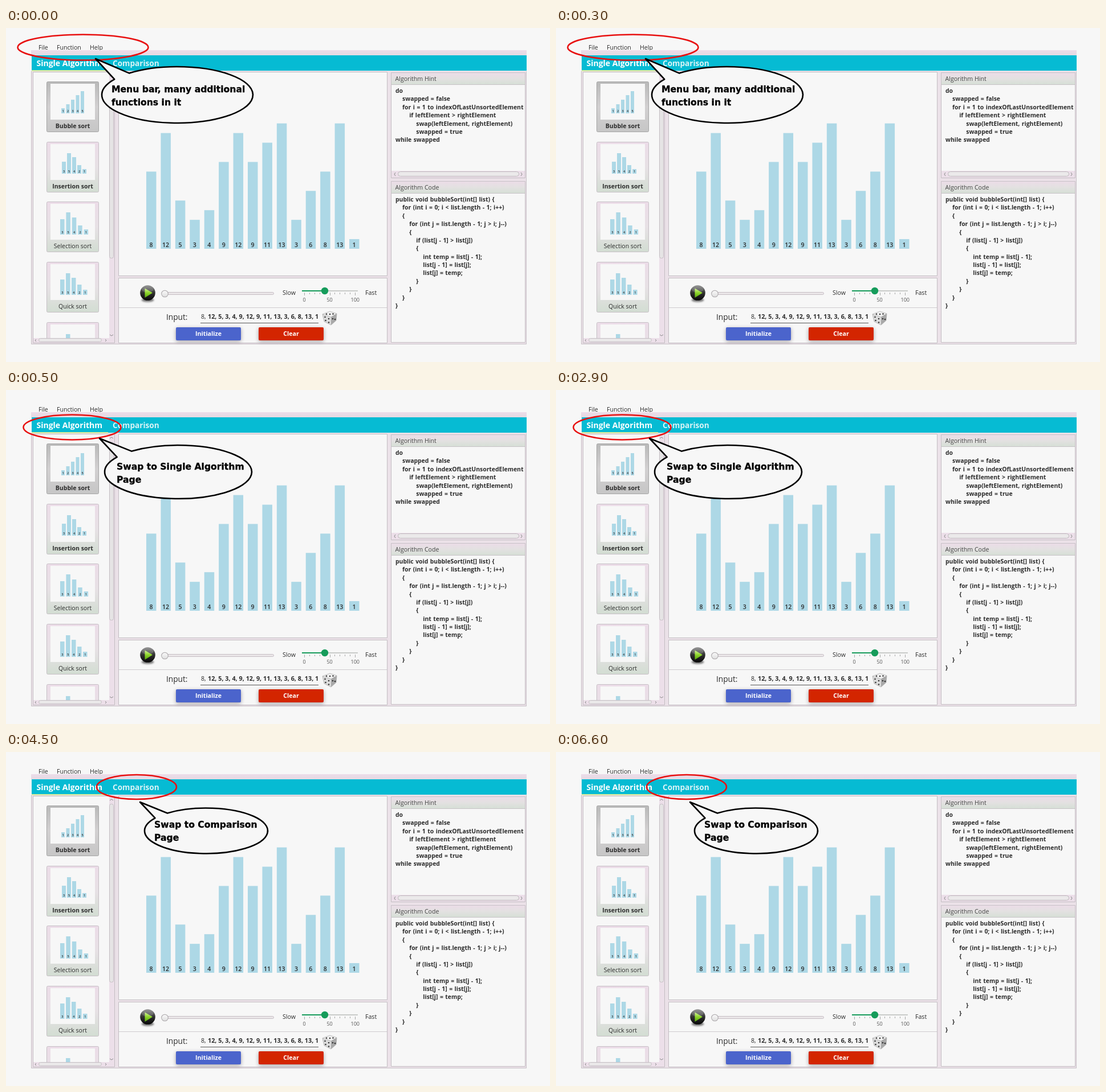
Write an HTML page with a canvas that moves like this. It is 954 px wide and 587 px high and loops after 8 s.

```html
<!DOCTYPE html>
<html lang="en">
<head>
<meta charset="utf-8">
<title>Sorting visualizer tour</title>
<style>
html, body { margin: 0; width: 100%; height: 100%; overflow: hidden; background: #f7f7f7; }
canvas { display: block; }
</style>
</head>
<body>
<canvas id="stage" width="954" height="587"></canvas>
<script>
const ctx = document.getElementById('stage').getContext('2d');
const BG = '#f7f7f7', INK = '#2b2b2b', BAR = '#add8e6', EDGE = '#c3bdc2', TRACK = '#ecdfe9';
const UI = '"Open Sans", "Noto Sans", sans-serif';
const LOOP = 8000;

const values = [8, 12, 5, 3, 4, 9, 12, 9, 11, 13, 3, 6, 8, 13, 1];

const cards = [
  { name: 'Bubble sort', weight: 700, x: 97, step: 8.5, w: 6, base: 150, tops: [141, 134, 126, 118, 111], digits: '12345' },
  { name: 'Insertion sort', weight: 700, x: 98, step: 9, w: 7, base: 256, tops: [235, 220, 227, 241, 248], digits: '35421' },
  { name: 'Selection sort', weight: 400, x: 95, step: 10.4, w: 7.5, base: 363, tops: [336, 324, 333, 347, 354], digits: '35421' },
  { name: 'Quick sort', weight: 400, x: 95, step: 10, w: 7.5, base: 469, tops: [442, 431, 439, 451, 460], digits: '35421' },
  { name: '', weight: 400, x: 95, step: 10, w: 7.5, base: 576, tops: [549, 538, 546, 558, 567], digits: '35421' }
];

const hint = `do
    swapped = false
    for i = 1 to indexOfLastUnsortedElement
        if leftElement > rightElement
            swap(leftElement, rightElement)
            swapped = true
while swapped`;

const code = `public void bubbleSort(int[] list) {
    for (int i = 0; i < list.length - 1; i++)
    {
        for (int j = list.length - 1; j > i; j--)
        {
            if (list[j - 1] > list[j])
            {
                int temp = list[j - 1];
                list[j - 1] = list[j];
                list[j] = temp;
            }
        }
    }
}`;

// ring: cx, cy, rx, ry; bubble: the same; tail: base, tip, base
const steps = [
  { start: 0, ring: [135, 34, 114.5, 22.5], bubble: [300.5, 117.5, 132.5, 49.5],
    tail: [[190, 90], [157, 54], [215, 79]], text: ['Menu bar, many additional', 'functions in it'], at: [185, 113] },
  { start: 500, ring: [116, 65.5, 85.5, 22], bubble: [302, 144, 129, 47],
    tail: [[195, 118], [164, 85], [219, 107]], text: ['Swap to Single Algorithm', 'Page'], at: [194, 140] },
  { start: 4500, ring: [229, 61.5, 70, 21.5], bubble: [351, 138.5, 108, 40],
    tail: [[261, 116], [235, 88], [282, 107]], text: ['Swap to Comparison', 'Page'], at: [260, 133] }
];

function rect(x, y, w, h, fill) {
  ctx.fillStyle = fill;
  ctx.fillRect(x, y, w, h);
}

function box(x, y, w, h, fill, stroke, r = 0) {
  ctx.beginPath();
  ctx.roundRect(x + .5, y + .5, w - 1, h - 1, r);
  ctx.fillStyle = fill;
  ctx.fill();
  ctx.lineWidth = 1;
  ctx.strokeStyle = stroke;
  ctx.stroke();
}

function line(points, color, width = 1) {
  ctx.beginPath();
  points.forEach(([x, y]) => ctx.lineTo(x, y));
  ctx.strokeStyle = color;
  ctx.lineWidth = width;
  ctx.stroke();
}

function disc(x, y, r, fill) {
  ctx.beginPath();
  ctx.arc(x, y, r, 0, Math.PI * 2);
  ctx.fillStyle = fill;
  ctx.fill();
}

function poly(points, fill) {
  ctx.beginPath();
  points.forEach(([x, y]) => ctx.lineTo(x, y));
  ctx.fillStyle = fill;
  ctx.fill();
}

function label(str, x, y, { size = 10.6, weight = 400, color = INK, align = 'left' } = {}) {
  ctx.font = `${weight} ${size}px ${UI}`;
  ctx.textAlign = align;
  ctx.fillStyle = color;
  ctx.fillText(str, x, y);
}

function fade(y0, y1, ...colors) {
  const g = ctx.createLinearGradient(0, y0, 0, y1);
  colors.forEach((c, i) => g.addColorStop(i / (colors.length - 1), c));
  return g;
}

function chevron(x, y, dx, dy, s = 3) {
  line([[x - dx - dy * s, y - dy - dx * s], [x + dx, y + dy], [x - dx + dy * s, y - dy + dx * s]], '#8a8a8a');
}

function listing(text, x, y) {
  ctx.wordSpacing = '0.8px';
  text.split('\n').forEach((row, i) => {
    const body = row.trimStart();
    label(body, x + (row.length - body.length) * 3.02, y + i * 14.38, { size: 10.4, weight: 700 });
  });
  ctx.wordSpacing = '0px';
}

function drawHeader() {
  label('File', 57, 38);
  label('Function', 89, 38);
  label('Help', 147, 38);
  rect(44, 39, 869, 9, fade(39, 48, '#ecdce8', '#e5dae3'));
  rect(45, 48, 868, 27, '#06bbd3');
  rect(45, 74, 134, 2, '#dcec9c');
  label('Single Algorithm', 53.5, 67, { size: 14, weight: 700, color: '#fff' });
  label('Comparison', 187, 67, { size: 13.6, weight: 700, color: '#d9f3f6' });
}

function drawCard(card, i) {
  const y = Math.round(94 + i * 105.7);
  const fill = i ? fade(y, y + 89, '#ecdce8', '#e7e1e5', '#d2ddd2') : fade(y, y + 89, '#b9b9b9', '#d2d0d1', '#c6c6c6');
  box(71, y, 92, 89, fill, i ? '#c6bfc5' : '#a5a5a5', 2);
  rect(78, y + 4, 78, 63, BG);
  card.tops.forEach((top, k) => {
    const x = card.x + k * card.step;
    rect(x, top, card.w, card.base - top, BAR);
    label(card.digits[k], x + card.w / 2, card.base - 2, { size: 5.5, weight: 600, align: 'center' });
  });
  label(card.name, 117, y + 82, { size: 10.5, weight: card.weight, align: 'center' });
}

function drawSidebar() {
  box(47, 77, 144, 477, BG, EDGE);
  ctx.save();
  ctx.beginPath();
  ctx.rect(48, 78, 132, 467);
  ctx.clip();
  cards.forEach(drawCard);
  ctx.restore();
  rect(181, 78, 9, 467, TRACK);
  box(181, 91, 8, 314, '#e6e4e5', '#c4bdc3', 3);
  chevron(185, 84, 0, -1);
  chevron(185, 540, 0, 1);
  rect(48, 545, 142, 8, TRACK);
  box(57, 545, 111, 7, '#eae8e9', '#c4bdc3', 3);
  chevron(52, 549, -1, 0, 2);
  chevron(175, 549, 1, 0, 2);
}

function drawChart() {
  box(197, 77, 472, 359, BG, EDGE);
  values.forEach((v, i) => {
    const x = 246 + i * 25.43, h = v * 16.95;
    rect(x, 388 - h, 17.5, h, BAR);
    label(v, x + 8.6, 385, { weight: 600, align: 'center' });
  });
}

function drawPlay() {
  ctx.save();
  ctx.filter = 'blur(1.5px)';
  ctx.beginPath();
  ctx.ellipse(248.5, 478, 11, 3.5, 0, 0, Math.PI * 2);
  ctx.fillStyle = '#777';
  ctx.fill();
  ctx.restore();
  disc(248.5, 465.5, 13.3, fade(452, 479, '#858585', '#303030', '#050505'));
  ctx.beginPath();
  ctx.ellipse(248.5, 459, 10.5, 6, 0, 0, Math.PI * 2);
  ctx.fillStyle = 'rgba(255,255,255,.16)';
  ctx.fill();
  poly([[243.5, 457.5], [257, 465.5], [243.5, 474]], fade(457, 474, '#d8f5a0', '#8ed52b', '#57a50d'));
}

function drawSpeed() {
  label('Slow', 485, 469);
  label('Fast', 630, 469);
  rect(519, 461, 98, 2, '#c9cbc9');
  rect(519, 461, 40, 2, '#159b5a');
  for (let i = 0; i <= 10; i++) {
    const x = Math.round(523 + i * 8.9) + .5;
    line([[x, 465], [x, i % 5 ? 468 : 470]], '#a9a9a9');
  }
  disc(559, 462, 6.2, '#169c5b');
  [0, 50, 100].forEach((n, i) => label(n, 523 + i * 44.6, 480.5, { size: 9, align: 'center', color: '#555' }));
}

function drawDice() {
  poly([[555, 503], [568, 498], [580, 502], [570, 508]], '#f0f0f0');
  poly([[555, 503], [570, 508], [570, 522], [558, 516]], '#dcdcdc');
  poly([[570, 508], [580, 502], [579, 514], [570, 522]], '#a9a9a9');
  line([[555, 503], [568, 498], [580, 502], [579, 514], [570, 522], [558, 516], [555, 503], [570, 508], [580, 502]], '#a6a6a6', .7);
  const pips = [[562, 502.7], [568, 503], [573.5, 502.5], [559.5, 508], [566, 511], [560.5, 514], [566, 517.5],
    [573, 511], [577, 512]];
  pips.forEach(([x, y]) => disc(x, y, 1.3, '#333'));
}

function button(str, x, fill) {
  ctx.save();
  ctx.shadowColor = 'rgba(80,70,80,.5)';
  ctx.shadowBlur = 7;
  ctx.shadowOffsetY = 2;
  ctx.beginPath();
  ctx.roundRect(x, 526, 114, 23, 2);
  ctx.fillStyle = fill;
  ctx.fill();
  ctx.restore();
  label(str, x + 57, 541, { weight: 700, color: '#fff', align: 'center' });
}

function drawControls() {
  box(197, 439, 472, 115, BG, EDGE);
  rect(198, 491, 470, 1, '#cfcacf');
  drawPlay();
  box(273, 464, 197, 5, '#eae6e8', '#c6bec4', 2.5);
  disc(278.5, 467, 6.3, '#aaa6a9');
  disc(278.5, 467, 5.3, fade(461, 473, '#fafafa', '#dedede'));
  drawSpeed();

  label('Input:', 281, 513, { size: 13.7 });
  ctx.save();
  ctx.beginPath();
  ctx.rect(341, 498, 207, 20);
  ctx.clip();
  label('8, ', 342, 511);
  label(values.slice(1).join(', '), 354, 511, { size: 10.8, weight: 700 });
  ctx.restore();
  rect(341, 518, 207, 1, '#555');
  drawDice();
  button('Initialize', 298, '#4b64cc');
  button('Clear', 443, '#d32500');
}

function panel(title, y, bottom) {
  box(675, y, 236, bottom - y, BG, EDGE);
  box(675, y, 236, 22, fade(y, y + 22, '#ecdce8', '#e3e1e1', '#d5dfd5'), '#c8c2c7');
  label(title, 682.5, y + 14.5, { color: '#444' });
}

function drawRight() {
  panel('Algorithm Hint', 78, 264);
  listing(hint, 683, 114);
  rect(676, 251, 234, 12, TRACK);
  box(687, 252, 213, 9, '#ebe9ea', '#beb8bd', 4);
  chevron(682, 257, -1, 0);
  chevron(904, 257, 1, 0);
  panel('Algorithm Code', 269, 553);
  listing(code, 683, 305);
}

function drawCallout({ ring, bubble, tail, text, at }) {
  ctx.beginPath();
  ctx.ellipse(...ring, 0, 0, Math.PI * 2);
  ctx.lineWidth = 2.6;
  ctx.strokeStyle = '#e81010';
  ctx.stroke();

  const [cx, cy, rx, ry] = bubble;
  const [left, tip, right] = tail;
  const angle = ([x, y]) => Math.atan2((y - cy) / ry, (x - cx) / rx);
  ctx.beginPath();
  ctx.ellipse(...bubble, 0, angle(right), angle(left) + Math.PI * 2);
  ctx.lineTo(...tip);
  ctx.closePath();
  ctx.fillStyle = BG;
  ctx.fill();
  ctx.lineWidth = 2.6;
  ctx.strokeStyle = '#000';
  ctx.stroke();

  ctx.font = '700 15.6px "DejaVu Sans", sans-serif';
  ctx.textAlign = 'left';
  ctx.lineWidth = .3;
  ctx.fillStyle = '#000';
  text.forEach((row, i) => {
    const y = at[1] + i * 22.7;
    ctx.fillText(row, at[0], y);
    ctx.strokeText(row, at[0], y);
  });
}

function draw(time) {
  const t = time % LOOP;
  rect(0, 0, 954, 587, BG);
  rect(44, 75, 869, 481, '#ebe1e8');
  line([[44.5, 76], [44.5, 555.5], [912.5, 555.5], [912.5, 76]], '#c8c1c7');
  drawHeader();
  drawSidebar();
  drawChart();
  drawControls();
  drawRight();
  drawCallout(steps.findLast(s => t >= s.start));
}

let origin;
function tick(now) {
  origin ??= now;
  draw(now - origin);
  requestAnimationFrame(tick);
}
ctx.lineJoin = 'round';
draw(0);
requestAnimationFrame(tick);
</script>
</body>
</html>
```
